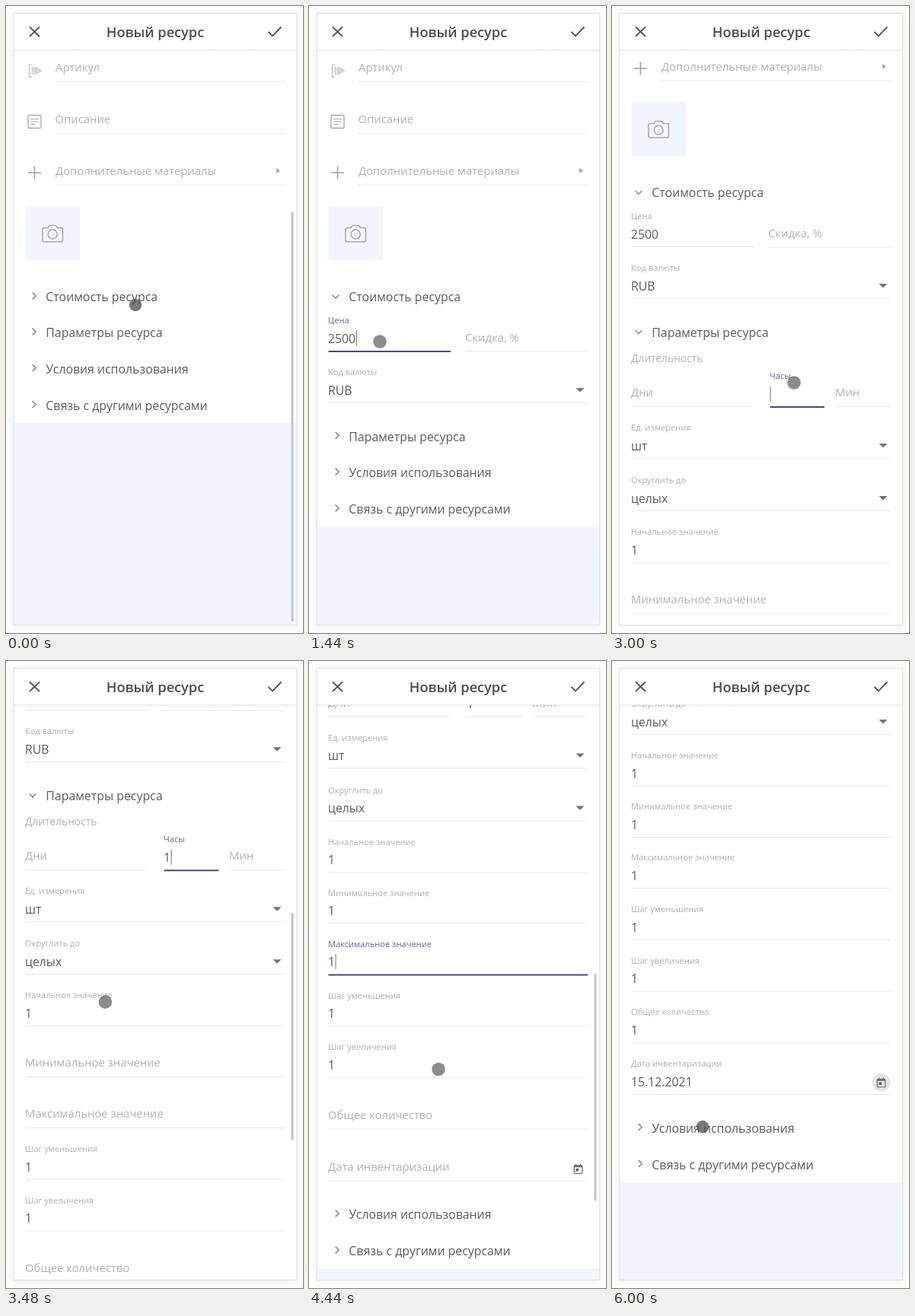
An HTML page for the animation above (6120 ms loop, 390x824 px).

```html
<!DOCTYPE html>
<html lang="ru">
<head>
<meta charset="utf-8">
<style>
html, body { margin: 0; width: 100%; height: 100%; overflow: hidden; background: #fcfcfc; }
svg { display: block; width: 390px; height: 824px; font-family: "Open Sans", "Noto Sans", sans-serif; }
text { white-space: pre; }
</style>
</head>
<body>
<svg id="stage" viewBox="0 0 390 824" xmlns="http://www.w3.org/2000/svg">
  <defs>
    <filter id="soft" x="-10%" y="-10%" width="120%" height="120%"><feGaussianBlur stdDeviation="3"/></filter>
    <linearGradient id="shade" x1="0" y1="0" x2="0" y2="1">
      <stop offset="0" stop-color="#000" stop-opacity=".06"/><stop offset="1" stop-color="#000" stop-opacity="0"/>
    </linearGradient>
    <clipPath id="view"><rect x="10" y="57" width="372" height="757"/></clipPath>
    <clipPath id="costClip"><rect id="costBox" x="10" y="398" width="372" height="0"/></clipPath>
    <clipPath id="paramClip"><rect id="paramBox" x="10" y="582" width="372" height="0"/></clipPath>
  </defs>
  <rect width="390" height="824" fill="#fcfcfc"/>
  <rect x="10" y="11" width="372" height="804" fill="#000" opacity=".06" filter="url(#soft)"/>
  <rect x="10" y="10" width="372" height="804" fill="#fff"/>
  <g clip-path="url(#view)">
    <g id="page">
      <g id="top"></g>
      <g id="cost"></g>
      <g clip-path="url(#costClip)"><g id="costBody"></g></g>
      <g id="lower">
        <g id="param"></g>
        <g clip-path="url(#paramClip)"><g id="paramBody"></g></g>
        <g id="tail"></g>
      </g>
    </g>
    <rect id="bar" x="374.5" width="3" rx="1.5" fill="#c3c3c8"/>
  </g>
  <rect x="10" y="57" width="372" height="5" fill="url(#shade)"/>
  <rect x="10" y="10" width="372" height="47" fill="#fff"/>
  <path d="M10 57.5H382" stroke="#ececee"/>
  <rect x="10" y="9.5" width="371.5" height="804" fill="none" stroke="#e0e4ea"/>
  <g id="head"></g>
  <circle id="dot" fill="#464646"/>
</svg>
<script>
const LOOP = 6120, STEP = 120;
const INK = '#5c5c5c', HINT = '#b2b2b2', RULE = '#e8e8ea', ACCENT = '#4d4687';
const $ = id => document.getElementById(id);

// y is the visual middle of the capitals
const text = (s, x, y, size, fill, extra = '') =>
  `<text x="${x}" y="${y + size * 0.35}" font-size="${size}" fill="${fill}" ${extra}>${s}</text>`;
const stroke = (d, color, w = 1) => `<path d="${d}" fill="none" stroke="${color}" stroke-width="${w}"/>`;
const rule = (x1, x2, y, color = RULE, w = 1) => stroke(`M${x1} ${y}H${x2}`, color, w);
const hint = (s, x, y) => text(s, x, y, 14.85, HINT);
const drop = y => `<path d="M350.5 ${y - 2}h11l-5.5 5.5z" fill="#757575"/>`;
const section = (s, y, open = 0) =>
  `<path d="M-2.3 -4.3L2.2 0L-2.3 4.3" transform="translate(${37 - 2 * open} ${y - 1.5 + open}) rotate(${90 * open})"
    fill="none" stroke="#8c8c8c" stroke-width="1.6"/>` + text(s, 52.3, y, 15.86, INK);

// focus = [from, to, caret end]; keys = [time of first key, gap between keys]
function field(t, label, line, { x1 = 25.5, x2 = 366, value = '', keys, focus, select } = {}) {
  const shown = keys ? value.slice(0, Math.max(0, Math.floor((t - keys[0]) / keys[1]) + 1)) : value;
  const active = focus && t >= focus[0] && t < focus[1];
  let out = active ? rule(x1, x2, line + 0.5, ACCENT, 2) : rule(x1, x2, line);
  if (!shown && !active) return out + hint(label, x1 - 0.5, line - 18.4);
  out += text(label, x1 - 0.5, line - 40.2, 11.1, active ? '#6a61a5' : '#b0b0b0');
  out += text(shown, x1 - 0.5, line - 16.4, 15.8, INK);
  if (select) out += drop(line - 17.5);
  if (active && t < focus[2]) {
    const cx = x1 + shown.length * 9.1 + 0.5;
    out += stroke(`M${cx} ${line - 27}v20`, '#777');
  }
  return out;
}

function calendar(y, lit) {
  return (lit ? `<circle cx="353.5" cy="${y}" r="12" fill="#e6e6e6"/>` : '') +
    `<rect x="348.2" y="${y - 4.5}" width="10.6" height="10.5" rx="1" fill="none" stroke="#666" stroke-width="1.2"/>` +
    stroke(`M348 ${y - 3.3}h11`, '#666', 2.2) + stroke(`M350.5 ${y - 6.5}v3M356.5 ${y - 6.5}v3`, '#666', 1.2) +
    `<rect x="350.4" y="${y - 0.5}" width="3.6" height="3.6" fill="#666"/>`;
}

function buildFixed() {
  $('head').innerHTML = stroke('M31 27.5L44 40M44 27.5L31 40', '#555', 1.8) +
    stroke('M344.5 34L350 39.5L361.5 27.5', '#555', 1.9) +
    text('Новый ресурс', 196, 34.5, 18.2, '#4c4c4c', 'font-weight="600" text-anchor="middle"');
  const gray = '#a8a8a8';
  $('top').innerHTML =
    stroke('M34 77h-3.5v16.5h3.5M34.5 80v10.5M37 80v10.5', '#bbb', 1.2) +
    '<path d="M39 80.5L46.5 85L39 89.5z" fill="#ddd" stroke="#bbb"/>' +
    hint('Артикул', 65, 81) + rule(65, 367, 99.5) +
    `<rect x="29" y="143.5" width="17" height="17" rx="1.5" fill="none" stroke="${gray}" stroke-width="1.3"/>` +
    stroke('M32 148.5h11M32 152h11M32 155.5h7', gray, 1.2) +
    hint('Описание', 64.5, 149) + rule(65, 367, 167.5) +
    stroke('M29 219h17M37.5 210.5v17', '#a0a0a0', 1.6) +
    hint('Дополнительные материалы', 65, 217) + rule(65, 367, 235) +
    '<path d="M355 213l5 3.5l-5 3.5z" fill="#a8a8a8"/>' +
    '<rect x="25.5" y="263.5" width="71.5" height="71" fill="#f2f5fd"/>' +
    `<path d="M50 291.5h5l2-3h8.5l2 3h5q2 0 2 2v14.5q0 2-2 2h-22.5q-2 0-2-2v-14.5q0-2 2-2z" fill="none" stroke="${gray}" stroke-width="1.5"/>` +
    `<circle cx="61.2" cy="300" r="6" fill="none" stroke="${gray}" stroke-width="1.5"/>`;
  $('tail').innerHTML = '<rect x="10" y="1389" width="372" height="1700" fill="#f2f5fd"/>' +
    section('Условия использования', 1318) + section('Связь с другими ресурсами', 1366);
}

const ease = (t, a, b) => {
  const u = Math.min(1, Math.max(0, (t - a) / (b - a)));
  return u * u * (3 - 2 * u);
};

// pointer stops: time, x, y
const path = [
  [0, 170, 393], [360, 170, 393], [720, 93, 441], [1440, 93, 441], [1680, 129, 570],
  [2040, 129, 433], [2160, 129, 427], [2520, 129, 427], [2880, 239, 495], [3000, 239, 495],
  [3240, 160, 700], [3600, 120, 360], [3720, 81, 441], [3960, 81, 441], [4080, 81, 495],
  [4200, 84, 507], [4320, 150, 650], [4560, 190, 423], [4680, 200, 485], [4800, 210, 487],
  [4920, 257, 542], [5160, 353, 553], [5520, 353, 553], [5880, 119, 612], [6120, 119, 612]
];
const presses = [[0, 240], [840, 960], [2280, 2400], [2880, 2999], [3720, 3840], [4200, 4320], [5280, 5400], [5950, 6120]];
const scrolls = [[0, 240], [1680, 2160], [3240, 3720], [4320, 4680]];
const within = (list, t) => list.some(([a, b]) => t >= a && t < b);

function pointer(t) {
  const i = path.findIndex(p => p[0] > t), [a, x, y] = path[i - 1], [b, u, v] = path[i];
  const k = ease(t, a, b);
  return [x + (u - x) * k, y + (v - y) * k];
}

function draw(t) {
  const cost = ease(t, 120, 360), param = ease(t, 2280, 2640);
  const scroll = 137 * ease(t, 1680, 2040) + 340 * ease(t, 3240, 3600) + 227 * ease(t, 4320, 4560);

  $('page').setAttribute('transform', `translate(0 ${-scroll})`);
  $('lower').setAttribute('transform', `translate(0 ${-136.5 * (1 - cost)})`);
  $('tail').setAttribute('transform', `translate(0 ${-704.5 * (1 - param)})`);
  $('costBox').setAttribute('height', 138 * cost);
  $('paramBox').setAttribute('height', 710 * param);

  $('cost').innerHTML = section('Стоимость ресурса', 382.5, cost);
  $('costBody').innerHTML =
    field(t, 'Цена', 453.5, { x2: 186, value: '2500', keys: [960, 120], focus: [840, 2400, 1680] }) +
    field(t, 'Скидка, %', 454, { x1: 205.5 }) +
    field(t, 'Код валюты', 521.5, { value: 'RUB', select: true });

  $('param').innerHTML = section('Параметры ресурса', 566, param);
  $('paramBody').innerHTML = text('Длительность', 25, 600, 13.8, HINT) +
    field(t, 'Дни', 663.5, { x2: 184 }) +
    field(t, 'Часы', 663.5, { x1: 207.5, x2: 279, value: '1', keys: [3120, 120], focus: [2880, 3720, 3600] }) +
    field(t, 'Мин', 663.5, { x1: 293.5 }) +
    field(t, 'Ед. измерения', 731.5, { value: 'шт', select: true }) +
    field(t, 'Округлить до', 800.5, { value: 'целых', select: true }) +
    field(t, 'Начальное значение', 868.5, { value: '1' }) +
    field(t, 'Минимальное значение', 935.5, { value: '1', keys: [3840, 120], focus: [3720, 4200, 4200] }) +
    field(t, 'Максимальное значение', 1002.5, { value: '1', keys: [4320, 120], focus: [4200, 4680, 4560] }) +
    field(t, 'Шаг уменьшения', 1070.5, { value: '1' }) +
    field(t, 'Шаг увеличения', 1138, { value: '1' }) +
    field(t, 'Общее количество', 1205.5, { value: '1', keys: [4800, 120], focus: [4680, 5280, 4920] }) +
    field(t, 'Дата инвентаризации', 1273.5, { value: '15.12.2021', keys: [5640, 1] }) +
    calendar(1258, t >= 5280);

  const total = 1051 + 136.5 * cost + 704.5 * param, track = 749;
  const bar = $('bar');
  bar.setAttribute('y', 60 + (295 + scroll) / total * track);
  bar.setAttribute('height', 756 / total * track);
  bar.setAttribute('opacity', within(scrolls, t) ? 1 : 0);

  const [x, y] = pointer(t), down = within(presses, t), dot = $('dot');
  dot.setAttribute('cx', x);
  dot.setAttribute('cy', y);
  dot.setAttribute('r', down ? 8.2 : 8.8);
  dot.setAttribute('opacity', down ? 0.72 : 0.62);
}

buildFixed();
let last = -1;
const start = performance.now();
function tick() {
  const t = Math.floor((performance.now() - start) % LOOP / STEP) * STEP;
  if (t !== last) draw(last = t);
  requestAnimationFrame(tick);
}
tick();
</script>
</body>
</html>
```
